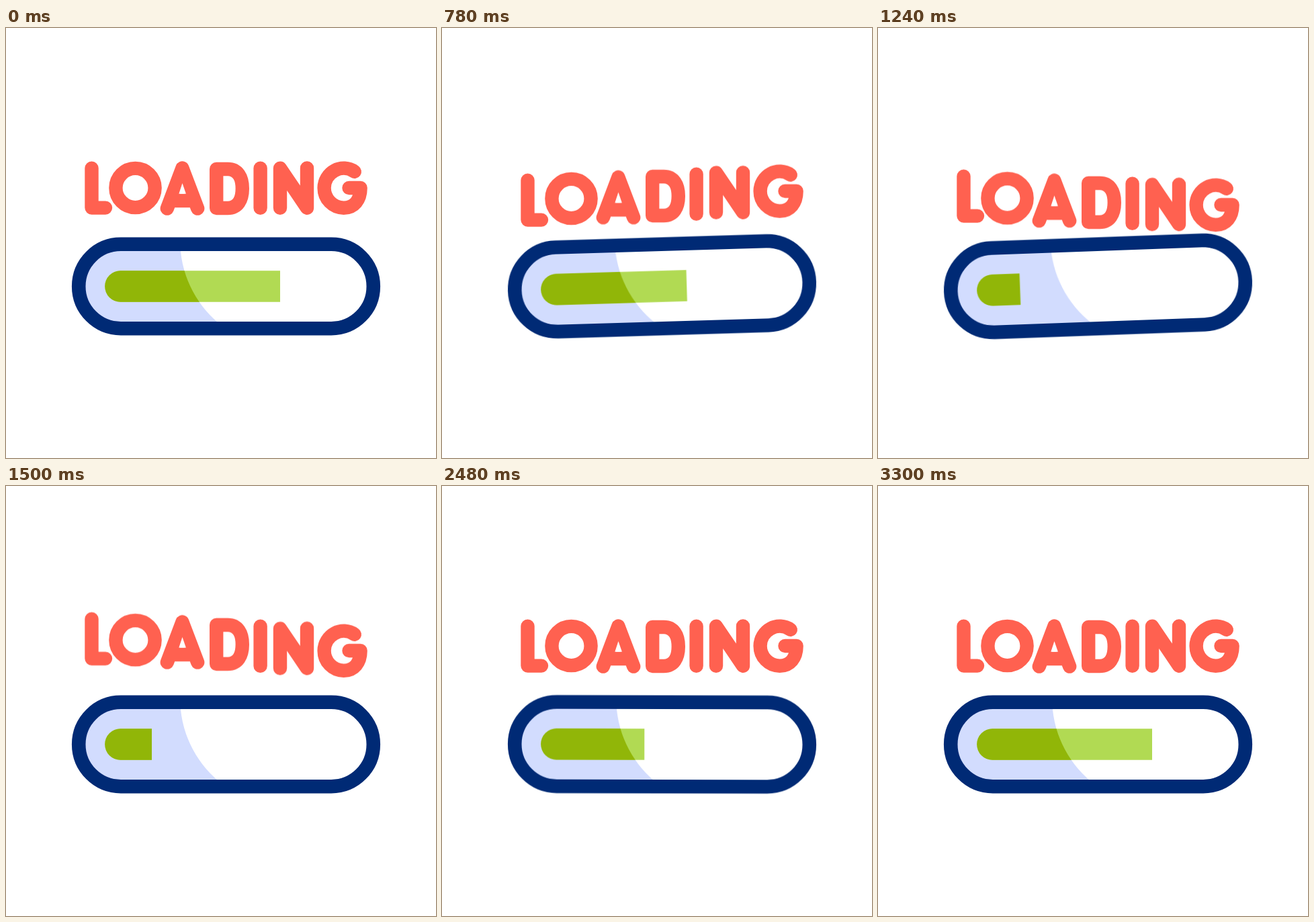
Recreate the animation shown at these times as an HTML page. Size 640x640 px, loop 3.62 s.

```html
<!DOCTYPE html>
<html lang="en">
<head>
<meta charset="utf-8">
<title>Loading</title>
<style>
  html, body { margin: 0; width: 100%; height: 100%; overflow: hidden; background: #fff; }
  svg { display: block; width: 100%; height: 100%; }

  .word > *, .capsule, .bar {
    animation: 3620ms cubic-bezier(.37, 0, .63, 1) infinite;
  }

  .word { fill: none; stroke: #ff6150; stroke-width: 20.4; stroke-linecap: round; stroke-linejoin: round; }
  .word > * { animation-name: wave; animation-delay: calc(var(--i) * 35ms); }
  .hole { fill: #fff; stroke: none; }

  .capsule { animation-name: tilt; transform-origin: 327.5px 384.5px; }
  .frame { fill: none; stroke: #002a75; stroke-width: 20.6; }
  .shade { fill: #d2dcfe; }
  .bar { animation-name: fill; width: 261px; fill: #b1da53; }
  .dark { fill: #91b608; }

  @keyframes wave {
    0%, 11.05% { transform: translateY(0); }
    27.62% { transform: translateY(25.5px); }
    44.2% { transform: translateY(-13.2px); }
    60.77%, 100% { transform: translateY(0); }
  }
  @keyframes tilt {
    0%, 16.57% { transform: rotate(0deg); }
    27.62% { transform: rotate(-4deg); }
    41.3%, 66.3% { transform: rotate(0deg); }
    82.87% { transform: rotate(3deg); }
    91.16%, 100% { transform: rotate(0deg); }
  }
  @keyframes fill {
    0% { width: 261px; }
    16.57% { width: 334.5px; }
    27.62% { width: 59px; }
    41.3%, 58.01% { width: 70px; }
    82.87% { width: 292px; }
    91.16%, 100% { width: 261px; }
  }
</style>
</head>
<body>
<svg viewBox="0 0 640 640" role="img" aria-label="Loading">
  <defs>
    <path id="shade" d="M171 325H259.4A160 160 0 0 0 322.5 444H171A59.5 59.5 0 0 1 171 325Z"/>
    <clipPath id="inShade"><use href="#shade"/></clipPath>
    <clipPath id="pill"><rect x="147.2" y="361.2" width="400" height="46.6" rx="23.3"/></clipPath>
  </defs>

  <g class="capsule">
    <use class="shade" href="#shade"/>
    <g clip-path="url(#pill)">
      <rect class="bar" x="147" y="361" height="47"/>
      <g clip-path="url(#inShade)"><rect class="bar dark" x="147" y="361" height="47"/></g>
    </g>
    <rect class="frame" x="108.2" y="321.8" width="438.6" height="125.4" rx="62.7"/>
  </g>

  <g class="word">
    <path style="--i:0" d="M127.5 208.6V267.6H148"/>
    <circle style="--i:1" cx="192.5" cy="238" r="29.1"/>
    <g style="--i:2">
      <path d="M239.8 268.6L262.4 208.6L285.2 268.6M248 257H277"/>
      <path class="hole" d="M262.5 231L257.3 246.8H267.9Z"/>
    </g>
    <path style="--i:3" d="M313.2 210H330C345 210 351.8 222 351.8 239C351.8 256 345 268 330 268H313.2Z"/>
    <path style="--i:4" d="M378.6 208.6V267.7"/>
    <path style="--i:5" d="M408 267.7V208.6L448 267.7V208.4"/>
    <path style="--i:6" d="M518.8 213.8A29 29.6 0 0 0 473.6 238A29 29.6 0 0 0 502.6 267.7C518 267.7 527.6 256 527.6 238H510.5"/>
  </g>
</svg>
</body>
</html>
```
